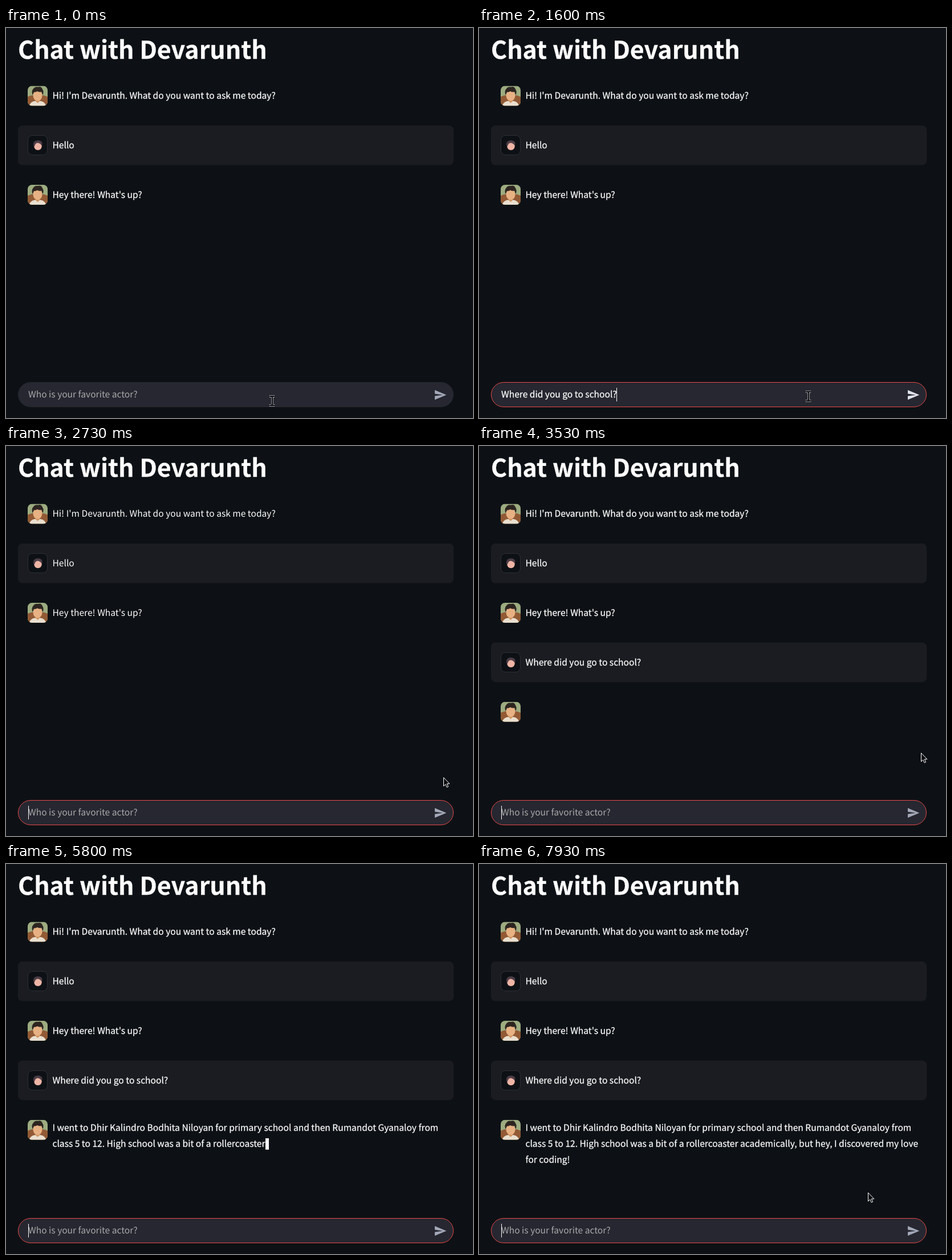
An HTML page that plays this animation: 819 by 684 pixels, repeating every 8 s.

```html
<!DOCTYPE html>
<html lang="en">
<head>
<meta charset="utf-8">
<title>Chat</title>
<style>
html, body { margin: 0; width: 100%; height: 100%; overflow: hidden; background: #0d1115; }
svg { display: block; width: 100%; height: 100%; }
text {
  font: 400 15.58px 'Noto Sans CJK SC', 'Noto Sans CJK JP', 'Noto Sans CJK', 'Open Sans', sans-serif;
  fill: #fdfdfd;
  white-space: pre;
  text-rendering: geometricPrecision;
}
.title { font-size: 42.9px; font-weight: 700; stroke: #fdfdfd; stroke-width: .3px; }
.hint { fill: #a9a9ac; }

/* One loop is 120 ticks; a tick is 1/15 s. */
.anim {
  --late: 0;
  animation: 8s step-end calc(var(--late) * 66.667ms - 4ms) infinite;
}
.log { stroke: #fdfdfd; animation-name: stale; }
.fresh { stroke: #fdfdfd; stroke-width: .25px; }
.field { fill: #262730; stroke: #262730; animation-name: focus; }
.send { fill: #a3a8b8; animation-name: ready; }
.empty { animation-name: empty; }
.typed { opacity: 0; animation-name: typed; }
.caret { fill: #fafafa; opacity: 0; animation-name: blink; }
.asked { opacity: 0; animation-name: asked; }
.answer { opacity: 0; animation-name: answer; }
.part { fill: transparent; stroke: transparent; stroke-width: .25px; animation-name: part; }
.block { opacity: 0; animation-name: block; }
.beam { animation-name: beam; }
.arrow { opacity: 0; animation-name: arrow; }

/* The log is drawn thinner while the page waits for the new message. */
@keyframes stale {
  0%, 35.8333%, 100% { stroke-width: .25px; }
  30.8333% { stroke-width: 0; }
}
@keyframes focus {
  0% { stroke: #262730; }
  7.5%, 100% { stroke: #e8494a; }
}
@keyframes ready {
  0%, 30.8333%, 100% { fill: #a3a8b8; }
  17.5% { fill: #dfe2ea; }
}
@keyframes empty {
  0%, 30.8333%, 100% { opacity: 1; }
  17.5% { opacity: 0; }
}
@keyframes typed {
  0%, 30.8333%, 100% { opacity: 0; }
  17.5% { opacity: 1; }
}
@keyframes blink {
  0%, 14.1667%, 24.1667%, 37.5%, 50.8333%, 64.1667%, 77.5%, 90.8333% { opacity: 0; }
  7.5%, 17.5%, 30.8333%, 44.1667%, 57.5%, 70.8333%, 83.3333%, 96.6667%, 100% { opacity: 1; }
}
@keyframes asked {
  0% { opacity: 0; }
  35.8333%, 100% { opacity: 1; }
}
@keyframes answer {
  0% { opacity: 0; }
  36.6667%, 100% { opacity: 1; }
}
@keyframes part {
  0% { fill: transparent; stroke: transparent; }
  70.8333%, 100% { fill: #fdfdfd; stroke: #fdfdfd; }
}
@keyframes block {
  0% { opacity: 0; transform: translate(501px, 453px); }
  70.8333% { opacity: 1; transform: translate(501px, 453px); }
  71.6667% { opacity: 1; transform: translate(174px, 481px); }
  72.5% { opacity: 1; transform: translate(455px, 481px); }
  73.3333% { opacity: 1; transform: translate(619px, 481px); }
  75% { opacity: 1; transform: translate(160px, 509px); }
  77.5%, 100% { opacity: 0; transform: translate(160px, 509px); }
}
@keyframes beam {
  0% { opacity: 1; transform: translate(467px, 654px); animation-timing-function: steps(6); }
  5% { opacity: 1; transform: translate(417px, 649px); }
  16.6667% { opacity: 1; transform: translate(417px, 649px); animation-timing-function: steps(4); }
  20% { opacity: 1; transform: translate(578px, 646px); animation-timing-function: steps(7); }
  25.8333% { opacity: 1; transform: translate(741px, 641px); }
  26.6667%, 100% { opacity: 0; transform: translate(741px, 641px); }
}
@keyframes arrow {
  0% { opacity: 0; transform: translate(752px, 643px); }
  26.6667% { opacity: 1; transform: translate(752px, 643px); }
  27.5% { opacity: 1; transform: translate(756px, 645px); }
  28.3333% { opacity: 1; transform: translate(748px, 645px); }
  30% { opacity: 1; transform: translate(748px, 645px); animation-timing-function: steps(5); }
  34.1667% { opacity: 1; transform: translate(767px, 581px); animation-timing-function: steps(4); }
  37.5% { opacity: 1; transform: translate(775px, 538px); }
  60.8333% { opacity: 1; transform: translate(787px, 538px); }
  61.6667% { opacity: 0; transform: translate(787px, 538px); }
  96.6667% { opacity: 1; transform: translate(812px, 546px); animation-timing-function: steps(3); }
  99.1667%, 100% { opacity: 1; transform: translate(682px, 576px); }
}
</style>
</head>
<body>
<svg viewBox="0 0 819 684">
  <defs>
    <clipPath id="tile"><rect width="35" height="35" rx="7.5"/></clipPath>
    <g id="host" clip-path="url(#tile)" stroke="none">
      <rect width="35" height="35" fill="#9dac80"/>
      <path d="M0 19Q8 15 17 17Q27 15 35 19V35H0Z" fill="#925a35"/>
      <path d="M3 35Q4 28 13 26.5H22Q31 28 32 35Z" fill="#e9dfcf"/>
      <path d="M14 22H21V27L17.5 30L14 27Z" fill="#cf935f"/>
      <ellipse cx="17.5" cy="17" rx="8" ry="9.5" fill="#e7b183"/>
      <path d="M8.5 16Q6 9 10 5Q13 1 18 2Q24 0 26 6Q29 10 26.5 16Q25 14 24.5 10.5Q20 11.5 17 9.5Q13 11.5 11 11Q10 14 8.5 16Z" fill="#2d2520"/>
    </g>
    <g id="guest" stroke="none">
      <rect x=".5" y=".5" width="34" height="34" rx="7.5" fill="#0d1115" stroke="#2d2f36" stroke-width="1"/>
      <ellipse cx="18" cy="19" rx="6.8" ry="7.3" fill="#eeb5a6"/>
      <path d="M10 18Q9 11 15 9.5Q21 7.5 25 12Q26.5 15 24.5 18Q22 14 18 13.5Q14 13.5 13 17L11.5 20Z" fill="#4b3c45"/>
    </g>
    <rect id="bubble" x="21" width="764" height="69.5" rx="8" fill="#1b1c21" stroke="none"/>
  </defs>

  <rect width="819" height="684" fill="#0d1115"/>
  <text class="title" x="21" y="54.3">Chat with Devarunth</text>

  <g class="anim log">
    <use href="#host" x="38" y="101.5"/>
    <text x="81.5" y="124">Hi! I'm Devarunth. What do you want to ask me today?</text>

    <use href="#bubble" y="171"/>
    <use href="#guest" x="38" y="188"/>
    <text x="81.5" y="211">Hello</text>

    <use href="#host" x="38" y="275"/>
    <text x="81.5" y="298">Hey there! What's up?</text>
  </g>

  <g class="anim asked">
    <use href="#bubble" y="344.7"/>
    <use href="#guest" x="38" y="362"/>
    <text class="fresh" x="81.5" y="384.6">Where did you go to school?</text>
  </g>

  <g class="anim answer">
    <use href="#host" x="38" y="448.7"/>
    <text x="81.5" y="468"><tspan class="anim part">I went to Dhir Kalindro Bodhita Niloyan for primary school </tspan><tspan class="anim part" style="--late:1">and then Rumandot Gyanaloy from</tspan></text>
    <text x="81.5" y="496"><tspan class="anim part" style="--late:1">class 5 to 12. </tspan><tspan class="anim part" style="--late:2">High school was a bit of a rollercoaster </tspan><tspan class="anim part" style="--late:3">academically, but hey, </tspan><tspan class="anim part" style="--late:5">I discovered my love</tspan></text>
    <text x="81.5" y="523.6"><tspan class="anim part" style="--late:5">for coding!</tspan></text>
    <rect class="anim block" width="6" height="20" fill="#fafafa"/>
  </g>

  <rect class="anim field" x="21.5" y="621.5" width="763" height="43" rx="21.5"/>
  <g class="anim empty">
    <text class="hint" x="39" y="648">Who is your favorite actor?</text>
    <rect class="anim caret" x="39" y="631" width="1" height="24"/>
  </g>
  <g class="anim typed">
    <text class="fresh" x="39" y="648">Where did you go to school?</text>
    <rect class="anim caret" x="241" y="631" width="1" height="24"/>
  </g>
  <path class="anim send" d="M752 635L772.3 643.5L752 652V645.4L766 643.5L752 641.6Z"/>

  <g class="anim beam" fill="none">
    <path d="M-4 -8H4M0 -8V8M-4 8H4" stroke="#0b0c10" stroke-width="2"/>
    <path d="M-5 -9.5H5M-5 -6.5H-1M1 -6.5H5M-1.5 -6V6M1.5 -6V6M-5 6.5H-1M1 6.5H5M-5 9.5H5" stroke="#fff" stroke-dasharray="1 1"/>
  </g>
  <path class="anim arrow" d="M.5 .5V15.5L3.8 12.3L6.2 17.6L8.6 16.5L6.3 11.3H10.8Z" fill="#08090c" stroke="#fff"/>
</svg>
</body>
</html>
```
